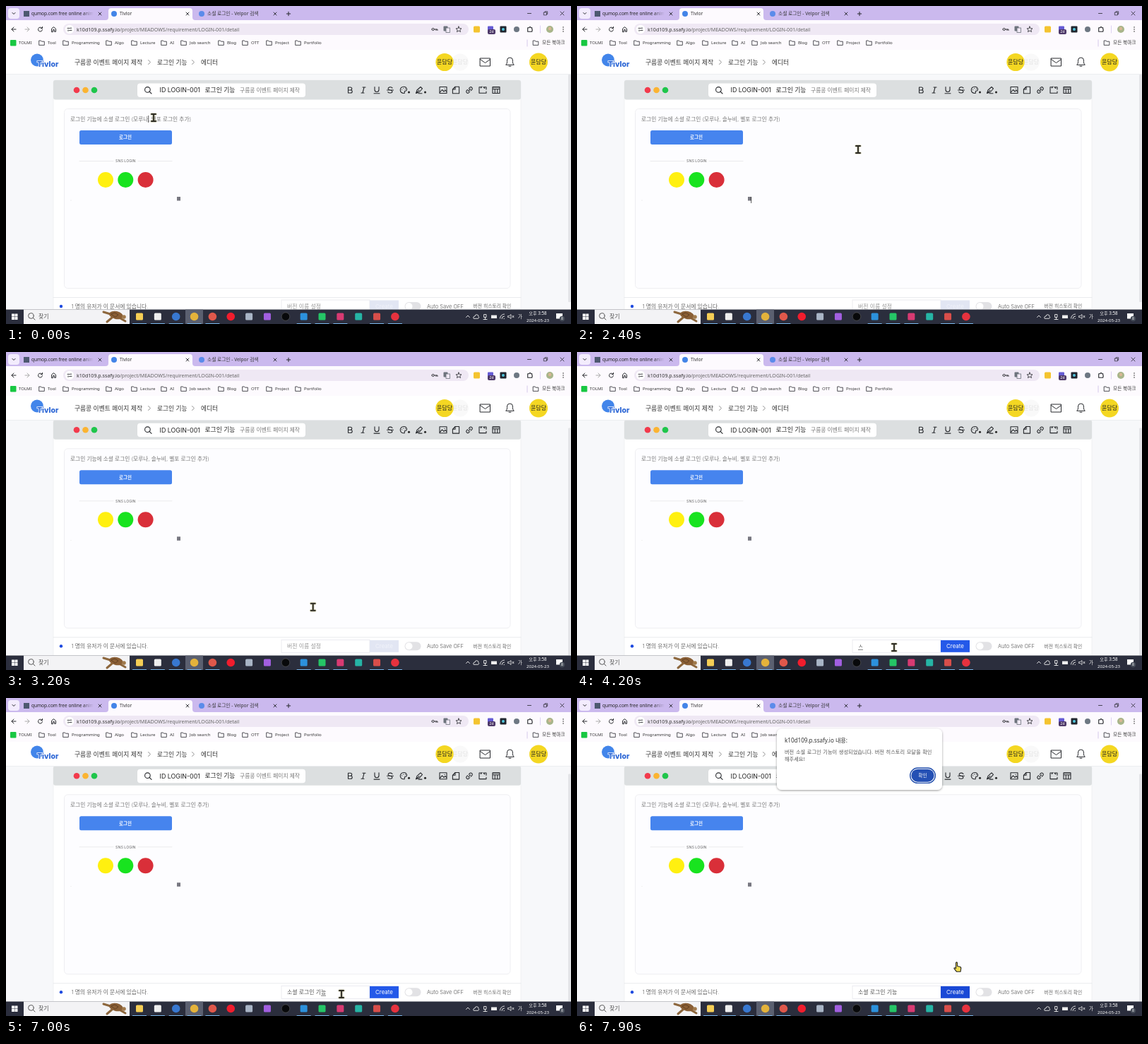
Write an HTML page that moves like this. It is 800x450 px and loops after 8000 ms.

```html
<!DOCTYPE html>
<html lang="ko">
<head>
<meta charset="utf-8">
<title>Requirement editor</title>
<style>
html, body { margin: 0; width: 100%; height: 100%; overflow: hidden; background: #fff; }
svg { display: block; width: 800px; height: 450px; }
text { font-family: Inter, 'Noto Sans CJK KR', 'Noto Sans CJK', sans-serif; white-space: pre; }
.ui text { font-family: 'Noto Sans', 'Noto Sans CJK KR', 'Noto Sans CJK', sans-serif; }
</style>
</head>
<body>
<svg id="stage" viewBox="0 0 800 450" xmlns="http://www.w3.org/2000/svg"></svg>
<script>
const LOOP = 8000, STEP = 100;

const attrs = o => Object.entries(o).map(([k, v]) => ` ${k}="${v}"`).join('');
const rect = (x, y, w, h, fill, o = {}) =>
  `<rect${attrs({ x, y, width: w, height: h, fill, ...o })}/>`;
const dot = (cx, cy, r, fill, o = {}) => `<circle${attrs({ cx, cy, r, fill, ...o })}/>`;
const line = (d, stroke = '#333', width = 1, o = {}) =>
  `<path${attrs({ d, fill: 'none', stroke, 'stroke-width': width, 'stroke-linecap': 'round', 'stroke-linejoin': 'round', ...o })}/>`;
// y is the middle of the line of text
const text = (x, y, size, str, fill = '#333', o = {}) =>
  `<text${attrs({ x, y: y + size * 0.36, 'font-size': size, fill, ...o })}>${str}</text>`;
const icon = (x, y, d, width = 1, color = '#26282c') =>
  line(d, color, width, { transform: `translate(${x} ${y})` });
const centre = { 'text-anchor': 'middle' };
const light = { 'font-weight': 300 };

const FOLDER = 'M-3.8 3V-3H-1L0 -1.8H3.8V3Z';
const CROSS = 'M-2 -2L2 2M2 -2L-2 2';
const SEARCH = 'M2.4 2.4L5 5M3.2 -.6A3.8 3.8 0 1 1 -4.4 -.6A3.8 3.8 0 1 1 3.2 -.6';

function browser() {
  let s = rect(0, 0, 800, 20, '#cbb9ee') + rect(0, 20, 800, 42, '#fdfafe');
  s += rect(3, 3, 16, 15, '#f3ecfd', { rx: 4 }) + icon(11, 10.5, 'M-2 -1L0 1L2 -1');
  s += `<path d="M141 20Q145 20 145 16V7Q145 3 149 3H260Q264 3 264 7V16Q264 20 268 20Z" fill="#fdfafe"/>`;
  s += rect(25, 7, 8, 8, '#4d5870') + dot(153, 11, 4, '#4385e8') + dot(277, 11, 4, '#5b8bea');
  s += text(36, 11, 6.5, 'qumop.com free online animate', 'url(#fade)');
  s += text(161, 11, 6.7, 'Tivlor') + text(285, 11, 6.7, '소셜 로그인 - Velpor 검색');
  for (const x of [133, 257, 381]) s += icon(x, 11, CROSS, 0.9);
  s += icon(400, 11, 'M-2.7 0H2.7M0 -2.7V2.7');
  s += icon(741, 10.5, 'M-2.5 0H2.5', 0.8) + icon(764, 10.5, 'M-2.3 -1.5H1.5V2.3H-2.3ZM-1 -1.5V-2.7H2.7V1H1.5', 0.7);
  s += icon(787.5, 10.5, 'M-2.5 -2.5L2.5 2.5M2.5 -2.5L-2.5 2.5', 0.8);

  s += icon(11, 33, 'M3 0H-3M0 -3L-3 0L0 3') + icon(30, 33, 'M-3 0H3M0 -3L3 0L0 3', 1, '#aaa');
  s += icon(48.5, 33, 'M2.2 -2A3 3 0 1 0 3 .6M3 -3.5V-1.3H.8');
  s += icon(67.5, 33, 'M-3 3.3V-.8L0 -3.4L3 -.8V3.3H1V.6H-1V3.3Z');
  s += rect(81, 25, 574, 16, '#efe8f4', { rx: 8 }) + dot(90, 33, 6.2, '#fff');
  s += icon(90, 33, 'M-3 -1.6H.4M-.4 1.6H3M2 -2.4V-.8M-2 .8V2.4', 0.9);
  s += text(100, 33, 7.1, 'k10d109.p.ssafy.io<tspan fill="#666">/project/MEADOWS/requirement/LOGIN-001/detail</tspan>');
  s += icon(607, 33, 'M-4 0A1.6 1.6 0 1 1 -.8 0A1.6 1.6 0 1 1 -4 0M-.8 0H4V1.5M2 0V1.5', 0.9);
  s += rect(619.5, 28.5, 6, 7, '#6d737c', { rx: 1 }) + rect(623, 31, 5.5, 6.5, '#efe8f4', { stroke: '#6d737c', 'stroke-width': 0.8 });
  s += icon(641, 33, 'M0 -4L1.1 -1.3L4 -1.1L1.8 .8L2.5 3.6L0 2L-2.5 3.6L-1.8 .8L-4 -1.1L-1.1 -1.3Z', 0.8);
  s += rect(662, 28.5, 9, 9, '#f4c430', { rx: 1.5 }) + rect(682, 28.5, 8, 7, '#655bd4', { rx: 1 });
  s += rect(682, 33, 11, 7, '#4d3868', { rx: 2 }) + text(687.5, 36.5, 5, '2d', '#fff', centre);
  s += rect(699.5, 28.5, 9, 9, '#20252e', { rx: 1 }) + dot(704, 33, 2, '#51c4db');
  s += rect(719, 29, 8, 8, '#6d7782', { rx: 4 });
  s += icon(742, 33, 'M-3.3 3.3V-2.2H-1.2A1.2 1.2 0 0 1 1.2 -2.2H2.8V0A1.2 1.2 0 0 1 2.8 2V3.3Z', 1.1);
  s += line('M756.5 28V38', '#d5c8ee', 0.8) + dot(770, 33, 5, '#a8b58a') + dot(770, 32, 2.2, '#d8b894');
  for (const y of [30, 33, 36]) s += dot(789, y, 0.8, '#333');

  s += rect(6, 48, 8.5, 8.5, '#18c742', { rx: 1 }) + text(18, 52, 6, 'TOLMI');
  const marks = { 59: 'Tool', 93: 'Programming', 154: 'Algo', 190: 'Lecture', 232: 'AI', 260: 'Job search',
    313: 'Blog', 347: 'OTT', 381: 'Project', 422: 'Portfolio' };
  for (const [x, name] of Object.entries(marks)) s += icon(x - 8.5, 52, FOLDER, 0.8) + text(+x, 52, 6.1, name);
  s += line('M738 48V57', '#cbbde6', 0.8) + icon(750, 52, FOLDER, 0.8) + text(759, 52, 6.7, '모든 북마크');
  return `<g class="ui">${s}</g>`;
}

function avatar(x, r) {
  return dot(x, 79.5, r, '#f4d722') + text(x, 79.5, 8, '윤담당', '#222', centre);
}

function header() {
  let s = rect(0, 62, 800, 34.5, '#fff') + line('M0 96.5H800', '#e8eaec', 0.8);
  s += dot(44, 76.5, 9, '#4285ea');
  s += text(44, 82.5, 10.5, 'Tivlor', '#2c66d5', { 'font-weight': 800, stroke: '#fff', 'stroke-width': 1.6, 'paint-order': 'stroke' });
  s += text(97, 79.5, 8.75, '구름콩 이벤트 페이지 제작') + text(214, 79.5, 8.7, '로그인 기능') + text(276, 79.5, 8.7, '에디터');
  for (const x of [203, 265]) s += icon(x, 79.5, 'M-1.5 -3L1.5 0L-1.5 3', 0.8, '#777');
  s += dot(643, 79.5, 12, '#f9f9f9') + text(643, 79.5, 8, '윤담당', '#e3e3e3', centre) + avatar(621, 12.6) + avatar(754, 13);
  s += icon(678.5, 79.5, 'M-7 -5.5H7V5.5H-7ZM-7 -4L0 1L7 -4', 1);
  s += icon(713.5, 79, 'M-5.5 4C-3.5 2 -4 0 -4 -2A4 4 0 0 1 4 -2C4 0 3.5 2 5.5 4ZM-1.5 6.2H1.5', 1);
  return s;
}

function toolbar() {
  let s = rect(67, 105, 662, 27.5, '#dcdfe0', { rx: 3 });
  s += dot(100, 119, 4.3, '#f23a4c') + dot(112.5, 119, 4.3, '#fbb431') + dot(125, 119, 4.3, '#1fc64b');
  s += rect(186, 109.5, 238, 19.5, '#fff', { rx: 4 }) + icon(201, 119, SEARCH, 1.1);
  s += text(217.5, 119, 8.9, 'ID LOGIN-001', '#222') + text(281.5, 119, 8.8, '로그인 기능', '#222');
  s += text(331, 119, 7.75, '구름콩 이벤트 페이지 제작', '#777', light);
  const icons = {
    487: 'M-2.5 -4H.7A2 2 0 0 1 .7 0H-2.5ZM-2.5 0H1.2A2 2 0 0 1 1.2 4H-2.5Z',
    506: 'M-1 -4H3M-3 4H1M1 -4L-1 4',
    525: 'M-3 -4.5V-.5A3 3 0 0 0 3 -.5V-4.5M-4 4.8H4',
    544: 'M3 -3C1 -5 -3 -4.4 -3 -2C-3 0 3 0 3 2C3 4.5 -2 4.6 -3.2 2.7M-4.5 0H4.5',
    563: 'M1 4.5C-7 5 -6 -4.8 0 -4.8C5 -4.8 6 1.2 2.2 1.2C0 1.2 2.5 3 1 4.5M-2.5 -.5V-.4M-.5 -2.5V-2.4M2.3 -1.7V-1.6',
    585: 'M-4.5 4.5L-3 0L2 -4.5L4.5 -2L0 3ZM-4.5 4.5L0 .3M-1 4.8H4',
    619: 'M-5 -4.5H5V4.5H-5ZM-4.5 3L-1.5 -.5L1 2L3 .2L5 2.5M2 -2V-1.9',
    637: 'M-1 -4.8H4.6V4.8H-4.6V-1ZM-1 -4.8V-1H-4.6',
    656: 'M-1.5 1.5L1.5 -1.5M-.6 -2.2L1 -4A2.2 2.2 0 0 1 4 -1L2.3 .7M.6 2.2L-1 4A2.2 2.2 0 0 1 -4 1L-2.3 -.7',
    675: 'M-2 -4.3H-5V4.3H5V2M2 -4.3H5V-1M-1 -4.8L-2.5 -3M1 -4.3L2.8 -2.5',
    694: 'M-5 -4.5H5V4.5H-5ZM-5 -1.5H5M-1.7 -1.5V4.5M1.7 -1.5V4.5M-5 -4H5'
  };
  for (const [x, d] of Object.entries(icons)) s += icon(x, 119, d, 1.1);
  return s + dot(570.5, 122, 1.5, '#222') + dot(593.5, 122, 1.5, '#222');
}

function page() {
  let s = rect(67, 105, 662, 340, '#fff', { rx: 3, stroke: '#eceef0', 'stroke-width': 0.8 }) + toolbar();
  s += rect(82.5, 145.5, 631.5, 254, '#fdfdff', { rx: 5, stroke: '#eeeef1', 'stroke-width': 1 });
  s += text(91, 160, 7.7, '', '#777', { ...light, id: 'body' }) + rect(0, 155, 0.8, 10, '#333', { id: 'caret' });
  s += rect(104, 176, 131, 20, '#4684ee', { rx: 2.5 }) + text(169, 186, 6.5, '로그인', '#fff', { ...centre, 'font-weight': 600 });
  s += line('M104 219.5H152M187 219.5H235', '#e6e6e8', 0.8) + text(169.3, 219.3, 5.3, 'SNS LOGIN', '#666', centre);
  s += dot(141, 246, 11, '#fff010') + dot(169.3, 246, 11, '#18e31f') + dot(197.6, 246, 11, '#d92f39');
  s += rect(242, 270, 5, 5.5, '#777780') + rect(246.3, 270, 0.8, 9, '#333', { id: 'imageCaret' }) + dot(92, 275, 0.4, '#bbb');
  s += line('M67 412.5H729', '#e5e6ea', 0.8) + dot(78, 425, 2.2, '#1f4be0');
  s += text(92.5, 425, 7.75, '1 명의 유저가 이 문서에 있습니다.', '#666', light);
  s += rect(390, 416, 125, 18, '#fff', { stroke: '#e9e9ee', 'stroke-width': 0.9 });
  s += text(398, 425, 7.9, '', '', { ...light, id: 'version' }) + rect(0, 429.5, 7, 0.7, '#444', { id: 'compose' });
  s += rect(515, 416.5, 41, 17, '', { id: 'create' }) + text(535.5, 425, 7.9, 'Create', '#fff', { ...centre, id: 'createLabel' });
  s += rect(564.5, 419, 23, 12, '#e2e2e5', { rx: 6 }) + dot(570.5, 425, 5, '#fff');
  s += text(596, 425, 7.5, 'Auto Save OFF', '#555', light) + text(661.5, 425, 6.8, '버전 히스토리 확인', '#666', light);
  return `<g clip-path="url(#view)">${rect(0, 96.5, 800, 333, '#f7f8fa')}<g id="page">${s}</g>
    ${rect(795.5, 97, 4.5, 333, '#f8f8fa')}${rect(796, 97, 4, 322, '#e4e5e8', { id: 'thumb', rx: 1 })}</g>`;
}

function taskbar() {
  let s = rect(0, 429.5, 800, 20.5, '#2b2e3d') + rect(25, 429.5, 150, 20.5, '#f3f3f5');
  for (const [x, y] of [[8, 435.5], [12.5, 435.5], [8, 440], [12.5, 440]]) s += rect(x, y, 4, 4, '#fff');
  s += icon(36, 439, SEARCH, 0.9, '#444') + text(46, 439.5, 8, '찾기', '#555');
  s += line('M148 436L138 433M150 441L143 447M162 442L169 446', '#8d673d', 3);
  s += `<ellipse cx="156" cy="437.5" rx="10" ry="5.5" fill="#8a5f35" transform="rotate(12 156 437.5)"/>`;
  s += dot(167, 440, 2.8, '#a07a4c') + line('M149 436L154 434L159 437L155 440Z', '#59391f', 0.8);
  s += rect(254, 429.5, 25, 20.5, '#5b6070');
  // colour and shape of each pinned application
  const apps = 'f5ce55q eeeeeeq 3878d0c e4b33bc df584bc f21d2dc a9b5c6q a25fe0q 08090bc 2c91dcq 25c566q d83a72q 26b5a5q d84e4aq e6323ec';
  apps.split(' ').forEach((app, i) => {
    const x = 189 + i * 25.85, color = '#' + app.slice(0, 6);
    s += app[6] === 'c' ? dot(x, 439.5, 5.8, color) : rect(x - 5, 434.5, 10, 10, color, { rx: 1.5 });
    if (![5, 6, 7, 8, 12].includes(i)) s += rect(x - 10, 449, 20, 1, '#79b5e8');
  });
  s += dot(396, 439.5, 5.8, 'none', { stroke: '#555', 'stroke-width': 0.7 });
  s += icon(654, 439.5, 'M-2.5 1L0 -1.5L2.5 1', 0.9, '#eee') + icon(666, 440, 'M-4 2A2 2 0 0 1 -2 -1A2.5 2.5 0 0 1 3 -.5A1.6 1.6 0 0 1 3 2Z', 0.9, '#eee');
  s += icon(678.5, 439.5, 'M-1.5 -3H1.5V1H-1.5ZM0 1V4M-2.5 4H2.5', 0.9, '#eee') + rect(687, 437.5, 8, 4.5, '#eee');
  s += icon(703, 440, 'M-3.5 2A6 6 0 0 1 2.5 -4M-1 2.5A3.5 3.5 0 0 1 2.5 -1M2 2.5H2.5', 0.9, '#eee');
  s += icon(715, 439.5, 'M-4 -1H-2.5L0 -3V3L-2.5 1H-4ZM2 -1.2L4 1.2M4 -1.2L2 1.2', 0.8, '#eee');
  s += text(728, 439.5, 7, '가', '#eee', centre);
  s += text(753, 435, 6.2, '오후 3:58', '#fff', centre) + text(753, 444.5, 6.1, '2024-05-23', '#fff', centre);
  s += rect(779, 435, 9, 7.5, '#fff') + dot(787.5, 442.5, 3.7, '#444b57') + text(787.5, 442.5, 5, '8', '#fff', centre);
  return `<g class="ui">${s}</g>`;
}

function dialog() {
  let s = rect(283, 43.5, 234, 86.5, '#fff', { rx: 7, filter: 'url(#shadow)' });
  s += text(294, 60.5, 8.1, 'k10d109.p.ssafy.io 내용:');
  s += text(294, 76, 7.2, '버전 소셜 로그인 기능이 생성되었습니다. 버전 히스토리 모달을 확인', '#555', { 'word-spacing': 0.8 });
  s += text(294, 86.8, 7.2, '해주세요!', '#555');
  s += rect(471.7, 99, 35.6, 21.4, '#fff', { rx: 10.7, stroke: '#2450ad', 'stroke-width': 1.4 });
  s += rect(473.4, 100.7, 32.2, 18, '#2450b4', { rx: 9 }) + text(489.5, 109.7, 6.8, '확인', '#fff', centre);
  return `<g class="ui" id="dialog">${s}</g>`;
}

function pointers() {
  const beam = 'M-3 -5H3M0 -5V5M-3 5H3';
  const hand = 'M-2.5 -6C-2.5 -7.5 -.5 -7.5 -.5 -6V-1.5L3 -.8C4.5 -.5 5 .3 4.7 2L4 6.3H-1.5L-5 1.8C-5.3 .5 -4 .2 -2.5 1.7Z';
  return `<g id="beam">${line(beam, '#b9b694', 3.2)}${line(beam, '#2c2b25', 1.8)}</g>
    <path id="hand" d="${hand}" fill="#f3de55" stroke="#222" stroke-width="1.1" stroke-linejoin="round"/>`;
}

document.getElementById('stage').innerHTML = `<defs>
  <clipPath id="view"><rect y="96.5" width="800" height="333"/></clipPath>
  <linearGradient id="fade" gradientUnits="userSpaceOnUse" x1="108" x2="124"><stop stop-color="#222"/><stop offset="1" stop-color="#222" stop-opacity="0"/></linearGradient>
  <filter id="shadow" x="-10%" y="-20%" width="120%" height="150%"><feDropShadow dx="0" dy="1" stdDeviation="1.5" flood-opacity=".4"/></filter>
</defs>` + page() + header() + browser() + taskbar() + dialog() + pointers();

const el = Object.fromEntries([...document.querySelectorAll('[id]')].map(e => [e.id, e]));
const show = (e, on) => { e.style.display = on ? '' : 'none'; };
const shift = (e, x, y) => e.setAttribute('transform', `translate(${x} ${y})`);

// latest entry whose time has passed
const latest = (list, t) => list.filter(([at]) => at <= t).pop()?.[1] ?? '';
const bodyTyping = [',', ', ', ', ㅅ', ', 소', ', 솔', ', 솔누', ', 솔눕', ', 솔누비'].map((s, i) => [700 + i * 100, s]);
const versionTyping = [
  ...['ㅅ', '소', '솟', '소세', '소셜'].map((s, i) => [4200 + i * 100, s]),
  ...['', 'ㄹ', '로', '록', '로그', '로긍', '로그이', '로그인', '로그인 ㄱ', '로그인 기'].map((s, i) => [4800 + i * 100, '소셜 ' + s]),
  ...['긴', '기느', '기능'].map((s, i) => [6200 + i * 100, '소셜 로그인 ' + s])
];
const path = [[0, 209, 158], [2000, 209, 158], [2400, 398, 203], [2500, 398, 203], [2700, 399, 218], [3400, 449, 418],
  [6700, 449, 418], [7000, 475, 419], [7400, 537, 417], [7600, 538, 416], [7900, 539, 381]];
const scroll = [[0, 0], [2600, -4], [2700, -7.5], [2800, -8.7]];

function pointerAt(t) {
  const i = Math.max(1, path.findIndex(p => p[0] >= t));
  const [t0, x0, y0] = path[i - 1], [t1, x1, y1] = path[i];
  const k = (t - t0) / (t1 - t0);
  return [x0 + (x1 - x0) * k, y0 + (y1 - y0) * k];
}

function draw(t) {
  const before = '로그인 기능에 소셜 로그인 (모루나' + latest(bodyTyping, t);
  el.body.textContent = before + ', 벨포 로그인 추가)';
  el.caret.setAttribute('x', 91 + el.body.getSubStringLength(0, before.length));
  show(el.caret, t < 500 || (t >= 700 && t < 1600));
  show(el.imageCaret, t >= 2400 && t < 2900);

  const offset = latest(scroll, t) || 0;
  shift(el.page, 0, offset);
  shift(el.thumb, 0, -offset * 1.2);

  const typed = latest(versionTyping, t);
  el.version.textContent = typed || '버전 이름 설정';
  el.version.setAttribute('fill', typed ? '#555' : '#999');
  const composing = typed && !typed.endsWith(' ') && t < 7500;
  show(el.compose, composing);
  if (composing) el.compose.setAttribute('x', 398 + el.version.getSubStringLength(0, typed.length - 1));

  const [x, y] = pointerAt(t), overButton = x >= 515;
  el.create.setAttribute('fill', !typed ? '#e2e6f3' : overButton ? '#1a49d6' : '#2459e9');
  el.createLabel.setAttribute('fill', typed ? '#fff' : '#f1f3fa');
  show(el.beam, !overButton);
  show(el.hand, overButton);
  shift(overButton ? el.hand : el.beam, x, y);
  show(el.dialog, t >= 7600);
}

const start = performance.now();
function tick() {
  const t = (performance.now() - start) % LOOP;
  draw(Math.floor(t / STEP) * STEP);
  requestAnimationFrame(tick);
}
tick();
</script>
</body>
</html>
```
